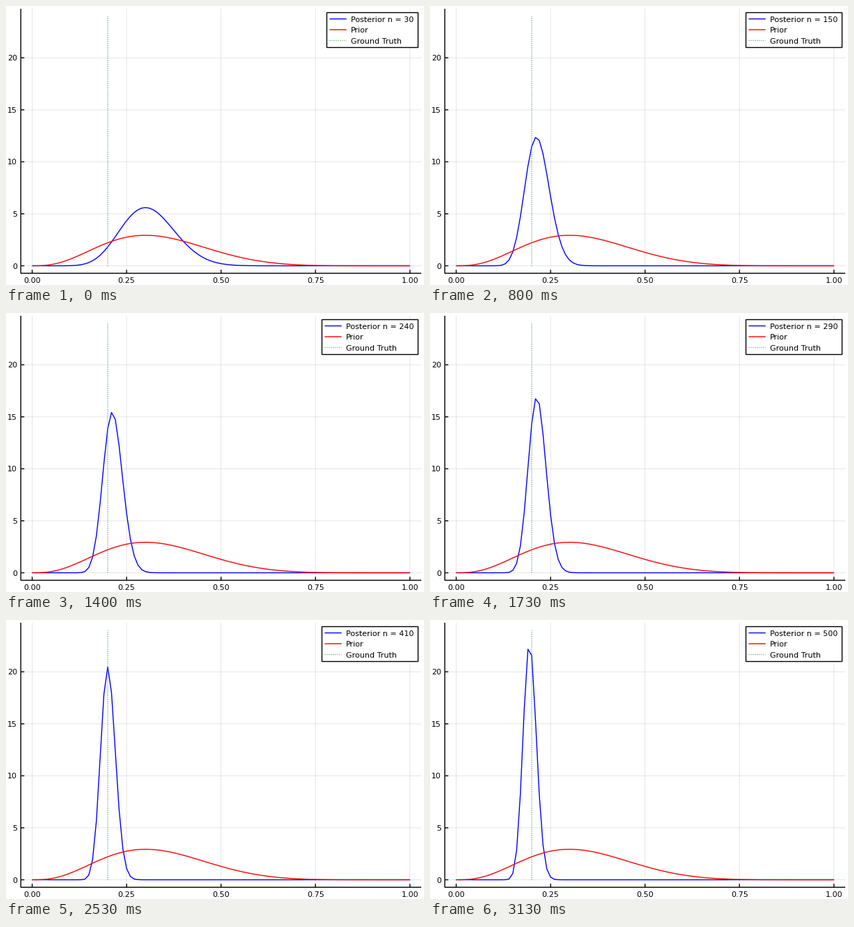
These frames come from a looping animation (600x400 px, 3.19 s). A matplotlib script:

```python
from math import lgamma

import matplotlib.pyplot as plt
import numpy as np
from matplotlib.animation import FuncAnimation
from matplotlib.patches import Rectangle

W, H, DPI = 600, 400, 100
LOOP_MS, FRAMES = 3190, 48
PX = 72 / DPI  # one pixel in points
LEFT, RIGHT, TOP, BOTTOM = 21.3, 596.06, 3.94, 383.2
GREEN = "#3da44d"
DOTS = (0, (1 * PX, 2 * PX))

plt.rcParams.update({"font.family": "DejaVu Sans", "font.size": 8})

# Successes counted after a number of trials; between them the rate is steady.
TRIALS = [30, 150, 200, 290, 360, 450, 500]
HITS = [9, 31, 41, 61, 73, 88, 96]

x = np.linspace(0, 1, 101)


def beta_pdf(a, b):
    p = np.clip(x, 1e-9, 1 - 1e-9)
    norm = lgamma(a + b) - lgamma(a) - lgamma(b)
    return np.exp(norm + (a - 1) * np.log(p) + (b - 1) * np.log(1 - p))


def posterior(n):
    hits = round(float(np.interp(n, TRIALS, HITS)))
    return beta_pdf(4 + hits, 8 + n - hits)


def px_x(v):
    return LEFT + (v + 0.03) / 1.06 * (RIGHT - LEFT)


def px_y(v):
    return BOTTOM - (v + 0.72) / 25.44 * (BOTTOM - TOP)


fig = plt.figure(figsize=(W / DPI, H / DPI), dpi=DPI, facecolor="white")
ax = fig.add_axes([0, 0, 1, 1])
ax.set_xlim(0, W)
ax.set_ylim(H, 0)
ax.axis("off")


def stroke(xs, ys, color="black", lw=1.0, **kw):
    kw = {"solid_capstyle": "butt", "dash_capstyle": "butt", "snap": False, **kw}
    return ax.plot(xs, ys, color=color, lw=lw, **kw)[0]


def label(px, py, s, ha):
    return ax.text(px, py + 4.05, s, ha=ha, va="baseline", zorder=6)


# Grid, ticks and tick labels
for v in np.linspace(0, 1, 5):
    u = px_x(v)
    stroke([u, u], [TOP, BOTTOM], lw=PX, alpha=0.1, zorder=1)
    stroke([u, u], [BOTTOM, BOTTOM - 5], zorder=2)
    label(u, 392.5, f"{v:.2f}", "center")
for v in range(0, 25, 5):
    u = px_y(v)
    stroke([LEFT, RIGHT], [u, u], lw=PX, alpha=0.1, zorder=1)
    stroke([LEFT, LEFT + 5], [u, u], zorder=2)
    label(16, u, str(v), "right")
stroke([LEFT, LEFT, RIGHT], [TOP, BOTTOM, BOTTOM], zorder=2,
       solid_joinstyle="miter")

# Curves
curve = stroke(px_x(x), px_y(posterior(30)), "blue", zorder=3)
stroke(px_x(x), px_y(beta_pdf(4, 8)), "red", zorder=3)
stroke([px_x(0.2)] * 2, [px_y(0), px_y(24)], GREEN, ls=DOTS, zorder=3)

# Legend
BOX_RIGHT, BOX_W, DIGIT_W = 591.1, 131.1, 7.07
box = ax.add_patch(Rectangle((0, 9.2), 1, 49.8, fc="white", ec="black",
                             lw=1, zorder=4))
rows = []
for row_y, text, color, style in [
    (18.5, "", "blue", "-"),
    (34, "Prior", "red", "-"),
    (49.5, "Ground Truth", GREEN, DOTS),
]:
    sample = stroke([0, 1], [row_y, row_y], color, ls=style, zorder=5)
    rows.append((sample, label(0, row_y, text, "left")))


def update(i):
    n = 30 + 10 * i
    curve.set_ydata(px_y(posterior(n)))
    width = BOX_W + DIGIT_W * (len(str(n)) - 2)
    left = BOX_RIGHT - width
    box.set_x(left)
    box.set_width(width)
    for sample, text in rows:
        sample.set_xdata([left + 4.5, left + 28.8])
        text.set_x(left + 35)
    rows[0][1].set_text(f"Posterior n = {n}")
    return []


anim = FuncAnimation(fig, update, frames=FRAMES, interval=LOOP_MS / FRAMES,
                     init_func=lambda: update(0), repeat=True, repeat_delay=0)
plt.show()
```
